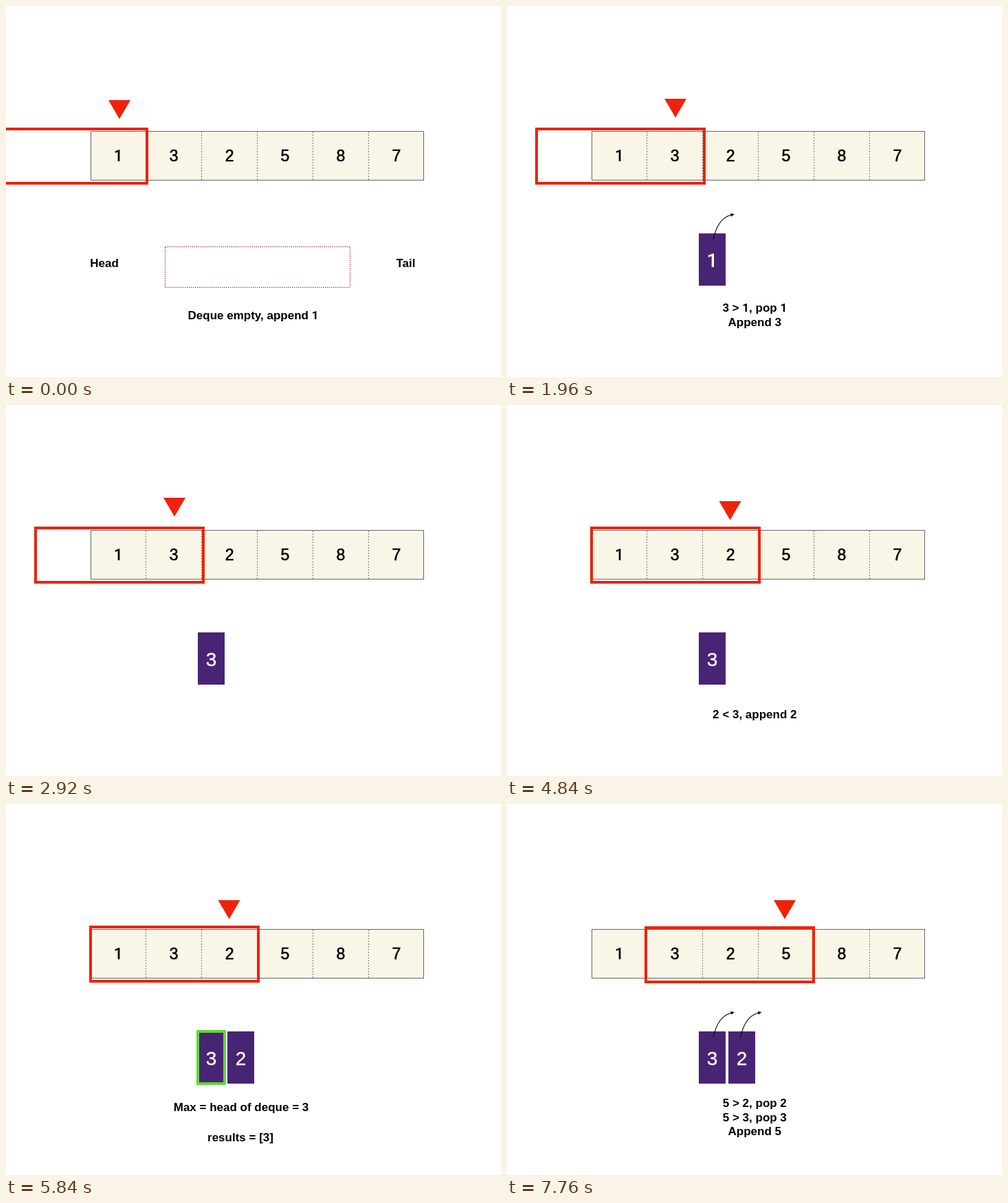
An HTML page for the animation above (8 s loop, 720 by 540 pixels).

```html
<!DOCTYPE html>
<html lang="en">
<head>
<meta charset="utf-8">
<title>Sliding window maximum with a deque</title>
<style>
  html, body { margin: 0; width: 100%; height: 100%; overflow: hidden; background: #fff; }
  svg { display: block; width: 100vw; height: 100vh; }
  text { font-family: "Liberation Sans", Arial, sans-serif; text-anchor: middle; }
  .label { font-size: 17px; font-weight: 700; }
  .cell { font-size: 23px; stroke: #000; stroke-width: .6px; }
  .item { font-size: 28px; fill: #fff; stroke: #fff; stroke-width: .4px; }
  .one { font-family: Roboto, sans-serif; }
  .cell .one, .item .one { font-weight: 500; stroke: none; }
</style>
</head>
<body>
<svg viewBox="0 0 720 540">
  <g id="array"></g>
  <g id="scene"></g>
</svg>
<script>
const LOOP = 8000;
const RED = '#ee220c', PURPLE = '#482474', GREEN = '#61d836', MAGENTA = '#99195e';

// Digit 1 is set without a foot.
const text = (cls, x, y, str) =>
  `<text class="${cls}" x="${x}" y="${y}">${
    String(str).replace(/</g, '&lt;').replace(/1/g, '<tspan class="one">1</tspan>')}</text>`;
const label = (x, y, str) => text('label', x, y, str);
const lines = (y, ...rows) => rows.map((row, i) => label(360.3, y + i * 20.5, row)).join('');
const frame = (x, y, w, h, color) =>
  `<rect x="${x}" y="${y}" width="${w}" height="${h}" fill="none" stroke="${color}" stroke-width="4"/>`;

const pointer = (x, y) => `<path d="M${x - 16} ${y}h32l-16 27.5z" fill="${RED}"/>`;
const cursor = (windowX, windowY, x, y) =>
  frame(windowX, windowY, 244, 79, RED) + pointer(x, y);

const deque = (...items) => items.map((n, i) => {
  const x = 279 + i * 43;
  return `<rect x="${x}" y="331" width="39" height="76" fill="${PURPLE}"/>`
    + text('item', x + 19.5, 380, n);
}).join('');

const popArrow = dx => `<g transform="translate(${dx})">
  <path d="M300 340Q306.5 309 326 304.3" fill="none" stroke="#000" stroke-width="1.1"/>
  <path d="M331 303l-6 -1.3 1.1 4.8z"/></g>`;

const emptyDeque = `<rect x="231.5" y="350.5" width="269" height="59" fill="none"
  stroke="${MAGENTA}" stroke-dasharray="1.5 1.5"/>`
  + label(143, 380, 'Head') + label(581.5, 380, 'Tail')
  + label(359.5, 456, 'Deque empty, append 1');

const at1 = cursor(-39, 179, 165, 137);
const at3 = cursor(43, 179, 245, 135);
const at2 = cursor(123, 179, 324.5, 140);
const at5 = cursor(202, 180, 404, 140);

const scenes = [
  [0, at1 + emptyDeque],
  [1000, at1 + deque(1)],
  [1960, at3 + deque(1) + popArrow(0) + lines(445, '3 > 1, pop 1', 'Append 3')],
  [2920, at3 + deque(3)],
  [3880, at2 + deque(3)],
  [4840, at2 + deque(3) + lines(456, '2 < 3, append 2')],
  [5840, at2 + deque(3, 2) + frame(279, 331, 39, 76, GREEN)
    + label(342, 447, 'Max = head of deque = 3') + label(341, 491, 'results = [3]')],
  [6800, at5 + deque(3, 2)],
  [7760, at5 + deque(3, 2) + popArrow(0) + popArrow(39.5)
    + lines(441, '5 > 2, pop 2', '5 > 3, pop 3', 'Append 5')],
];

const values = [1, 3, 2, 5, 8, 7];
document.getElementById('array').innerHTML =
  '<rect x="123.5" y="182.5" width="484" height="71" fill="#faf6e7" stroke="#666"/>'
  + values.map((n, i) => {
    const divider = i
      ? `<path d="M${122.5 + i * 81} 183v70" stroke="#777" stroke-dasharray="2 2"/>` : '';
    return divider + text('cell', 163.3 + i * 80.9, 226, n);
  }).join('');

const stage = document.getElementById('scene');
const start = performance.now();
let shown = -1;

function draw(now) {
  const t = Math.max(0, now - start) % LOOP;
  const current = scenes.findLastIndex(([from]) => t >= from);
  if (current !== shown) stage.innerHTML = scenes[shown = current][1];
  requestAnimationFrame(draw);
}
draw(start);
</script>
</body>
</html>
```
